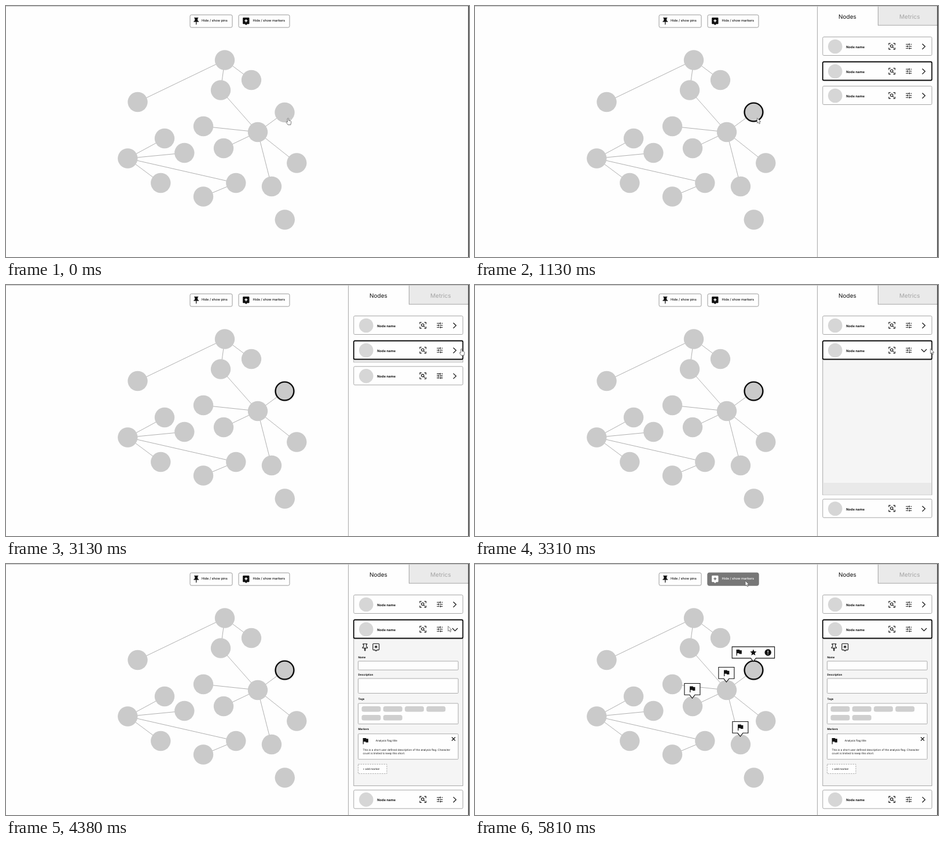
Write an HTML page that moves like this. It is 800x434 px and loops after 7440 ms.

```html
<!DOCTYPE html>
<html lang="en">
<head>
<meta charset="utf-8">
<title>Node graph prototype</title>
<style>
  html, body { margin: 0; width: 100%; height: 100%; overflow: hidden; background: #fefefe; }
  svg { display: block; width: 100vw; height: 100vh; font-family: Inter, Roboto, sans-serif; text-rendering: geometricPrecision; }
</style>
</head>
<body>
<svg id="stage" viewBox="0 0 800 434" preserveAspectRatio="none"></svg>
<script>
const LOOP = 7440;
const INK = '#111', LINE = '#a6a6a6', PAPER = '#fefefe';
const stage = document.getElementById('stage');

// Icons live on a 24-unit grid centred on (12, 12).
const ICON = {
  pin: 'M16 9V4h1a1 1 0 0 0 0-2H7a1 1 0 0 0 0 2h1v5a3 3 0 0 1-3 3v2h6v7l1 1 1-1v-7h6v-2a3 3 0 0 1-3-3z',
  bubble: 'M19 2H5a2 2 0 0 0-2 2v14a2 2 0 0 0 2 2h4l3 3 3-3h4a2 2 0 0 0 2-2V4a2 2 0 0 0-2-2z',
  spark: 'M12 6l1.6 3.4L17 11l-3.4 1.6L12 16l-1.6-3.4L7 11l3.4-1.6z',
  flag: 'M14.4 6L14 4H5v17h2v-7h5.6l.4 2h7V6z',
  star: 'M12 17.3L18.2 21l-1.6-7L22 9.2l-7.2-.6L12 2 9.2 8.6 2 9.2 7.5 14l-1.7 7z',
  focus: 'M3 8V3h5M16 3h5v5M21 16v5h-5M8 21H3v-5M14 14l3.5 3.5M15 11.2a3.8 3.8 0 1 1-7.6 0a3.8 3.8 0 1 1 7.6 0',
  tune: 'M2 5h12M18 5h4M14 2v6M2 12h5M11 12h11M8 9v6M2 19h9M15 19h7M14 16v6'
};

const icon = (name, x, y, scale, fill = INK, extra = '') =>
  `<path d="${ICON[name]}" transform="translate(${x} ${y}) scale(${scale}) translate(-12 -12)" fill="${fill}" ${extra}/>`;
const outlineIcon = (name, x, y, scale, width = 2) =>
  icon(name, x, y, scale, 'none', `stroke="${INK}" stroke-width="${width}"`);
const text = (s, x, y, size, extra = '') =>
  `<text x="${x}" y="${y}" font-size="${size}" fill="${INK}" ${extra}>${s}</text>`;
const rect = (x, y, w, h, fill, stroke = 'none', extra = '') =>
  `<rect x="${x}" y="${y}" width="${w}" height="${h}" fill="${fill}" stroke="${stroke}" ${extra}/>`;
const stroked = (d, width = 1.2, extra = '') =>
  `<path d="${d}" fill="none" stroke="${INK}" stroke-width="${width}" ${extra}/>`;

const nodes = {
  a: [378, 93.5], b: [424, 128], c: [371, 145.5], d: [227.5, 166], e: [481.5, 184],
  f: [341, 208], g: [435, 218], h: [376, 246], i: [274, 229], j: [308.3, 254],
  k: [210.3, 263.5], l: [502.3, 271.5], m: [267.3, 306], n: [397.3, 306],
  o: [341, 329.5], p: [459, 312], q: [481.8, 369.5]
};
const edges = 'ad ab ac cg ge gf gh gl gp ki kj km kn no'.split(' ');

function graph() {
  const lines = edges.map(([s, t]) => `M${nodes[s]}L${nodes[t]}`).join('');
  const discs = Object.values(nodes).map(([x, y]) => `<circle cx="${x}" cy="${y}" r="17.2"/>`).join('');
  return `<path d="${lines}" stroke="${LINE}" stroke-width=".9"/><g fill="#cacaca">${discs}</g>
    <circle id="ring" cx="481.5" cy="183.5" r="15.9" fill="none" stroke="#0a0a0a" stroke-width="2.4"/>`;
}

function button(x, w, label, textX, iconName, dark) {
  const fg = dark ? PAPER : INK, bg = dark ? '#777' : PAPER;
  const glyph = iconName === 'pin'
    ? icon('pin', 328.7, 26.2, .62, fg)
    : icon('bubble', 414.8, 26.2, .63, fg) + icon('spark', 414.8, 26.2, .63, bg);
  return rect(x, 15.3, w, 21.8, bg, dark ? '#777' : '#999', 'rx="2.5"') + glyph +
    text(label, textX, 27.3, 5.65, `style="fill:${fg}" font-weight="500"`);
}

function card(y, selected) {
  const chevron = 'M772.8 65.7L777.7 70.3L772.8 75';
  const down = 'M771.2 68.2L775.8 72.8L780.4 68.2';
  return `<g transform="translate(0 ${y})">` +
    rect(600.8, .5, 188.6, 32, PAPER, selected ? '#0a0a0a' : LINE, `rx="2" stroke-width="${selected ? 1.8 : 1}"`) +
    '<circle cx="622.3" cy="17" r="12.3" fill="#d6d6d6"/>' +
    text('Node name', 641.2, 20, 5.75, 'font-weight="700"') +
    outlineIcon('focus', 720.4, 16.7, .58) + outlineIcon('tune', 749.5, 16.8, .5, 2.2) +
    `<g transform="translate(0 -53.2)">${stroked(chevron, 1.2, selected ? 'id="closed"' : '')}` +
    `${selected ? stroked(down, 1.2, 'id="open"') : ''}</g></g>`;
}

function details() {
  const label = (s, y) => text(s, 608.5, y, 4.6, 'font-weight="700"');
  const field = (y, h) => rect(608.5, y, 172.8, h, PAPER, '#999', 'rx="1" stroke-width=".8"');
  const pills = [0, 1, 2, 3, 4, 5].map(n =>
    rect(614.5 + n % 4 * 37.3, n < 4 ? 246 : 261, 33, 9.4, '#cfcfcf', 'none', 'rx="3.5"')).join('');
  return outlineIcon('pin', 620.3, 144, .6, 1.8) +
    outlineIcon('bubble', 639.3, 143.8, .6, 1.8) + icon('spark', 639.3, 143.8, .6) +
    label('Name', 163) + field(168, 15.2) +
    label('Description', 193) + field(198, 25.5) +
    label('Tags', 235.2) + field(241, 35.6) + pills +
    label('Markers', 286.7) + field(293.7, 44) +
    icon('flag', 621, 306, .62) + text('Analysis flag title', 638.7, 307.2, 4.65) +
    stroked('M770.3 299.5l6 6M776.3 299.5l-6 6', 1.1) +
    text('This is a short user defined description of the analysis flag. Character', 616.5, 322.5, 4.6) +
    text('count is limited to keep this short.', 616.5, 329, 4.6) +
    rect(608.5, 346.2, 49.5, 16.2, PAPER, '#999', 'stroke-width=".8" stroke-dasharray="2.5 1.5"') +
    text('+ add marker', 616.5, 355.7, 4.6);
}

function panel() {
  return rect(591.6, -2, 220, 440, PAPER, LINE) +
    rect(696.5, -2, 112, 35.3, '#eaeaea', LINE) +
    text('Nodes', 643.4, 22, 10, 'text-anchor="middle"') +
    text('Metrics', 751, 22, 10, 'text-anchor="middle" style="fill:#a3a3a3"') +
    `<g id="body">${rect(600.8, 126, 188.6, 0, '#f5f5f5', LINE, 'id="bodyBox"')}
      ${rect(601.3, 126, 187.6, 0, '#e9e9e9', 'none', 'id="band"')}
      <g id="details">${details()}</g></g>` +
    card(53) + card(96, true) + `<g id="lastCard">${card(138)}</g>`;
}

function callout(key, half, tipY, glyphs) {
  const x = nodes[key][0] - .6;
  return `<path d="M${x - half} ${tipY - 25.5}h${half * 2}v19.8H${x + 4.5}L${x} ${tipY}L${x - 4.5} ${tipY - 5.7}H${x - half}z"
    fill="${PAPER}" stroke="${INK}" stroke-width="1.1"/>` + glyphs(x, tipY - 15.6);
}

function callouts() {
  const flag = (x, y) => icon('flag', x, y, .62);
  const trio = (x, y) => flag(x - 25, y) + icon('star', x, y, .56) +
    `<circle cx="${x + 25.3}" cy="${y}" r="5.7" fill="${INK}"/>` +
    `<path d="M${x + 25.3} ${y - 3.2}v3.8M${x + 25.3} ${y + 1.8}v1.4" stroke="${PAPER}" stroke-width="1.3"/>`;
  return callout('g', 13.5, 204, flag) + callout('h', 13.5, 232, flag) +
    callout('p', 13.5, 298, flag) + callout('e', 36.7, 168.6, trio);
}

const cursor = `<g id="cursor" fill="#fff" stroke="#666" stroke-width=".9" stroke-linejoin="round">
  <path id="arrow" d="M0 0V8.6L2 6.9L3.5 10L5 9.3L3.6 6.3H6.2z"/>
  <path id="hand" d="M-1.2 .9Q0 -.6 1 .9V4.3L4.3 5Q5.4 5.4 5.2 6.8L4.4 11.6H-.4L-3.3 7.6Q-3.5 6.1 -2.2 6.4L-1.2 7.3z"/>
</g>`;

stage.innerHTML = rect(0, 0, 800, 434, PAPER) + graph() +
  button(318, 73, 'Hide / show pins', 338, 'pin') +
  button(402, 88, 'Hide / show markers', 426.6, 'bubble') +
  `<g id="markers">${button(402, 88, 'Hide / show markers', 426.6, 'bubble', true)}${callouts()}</g>
  <g id="panel">${panel()}</g>` +
  rect(0, 0, 800, 1, '#c4c4c4') + rect(798.6, 0, 1.4, 434, '#333') + cursor;

const part = {};
stage.querySelectorAll('[id]').forEach(el => part[el.id] = el);

const span = (t, from, to) => Math.min(1, Math.max(0, (t - from) / (to - from)));
const easeOut = p => 1 - (1 - p) ** 3;
const easeInOut = p => p < .5 ? 4 * p ** 3 : 1 - 4 * (1 - p) ** 3;
const set = (name, attrs) => { for (const k in attrs) part[name].setAttribute(k, attrs[k]); };

function pointer(t) {
  const out = easeInOut(span(t, 1700, 2330));
  const back = easeInOut(span(t, 4200, 4890));
  const x = 487.5 + 299.5 * easeInOut(span(t, 1650, 2220)) - 320 * back;
  const y = 193.8 - 83.6 * out - 81.2 * back ** 1.3;
  return [x, y];
}

function draw(t) {
  set('ring', { opacity: span(t, 580, 700) });

  const slide = easeOut(span(t, 590, 1140));
  set('panel', { transform: `translate(${210 * (1 - slide)} 0)` });

  const grow = easeOut(span(t, 3130, 3450));
  const bottom = 131 + 252.4 * grow;
  const band = Math.min(bottom - 131, 252 * (1 - grow));
  set('body', { display: grow ? 'inline' : 'none' });
  set('bodyBox', { height: bottom - 126 });
  set('band', { y: bottom - band, height: band });
  set('details', { opacity: span(t, 3320, 3600) });
  set('lastCard', { transform: `translate(0 ${252.4 * grow})` });
  const turned = span(t, 3140, 3260);
  set('closed', { opacity: 1 - turned });
  set('open', { opacity: turned });

  set('markers', { opacity: span(t, 5640, 5790) });

  const pressing = t < 630 || (t >= 2330 && t < 3190) || (t >= 5000 && t < 5690);
  set('cursor', { transform: `translate(${pointer(t)})` });
  set('hand', { display: pressing ? 'inline' : 'none' });
  set('arrow', { display: pressing ? 'none' : 'inline' });
}

const start = performance.now();
function tick() {
  draw((performance.now() - start) % LOOP);
  requestAnimationFrame(tick);
}
tick();
</script>
</body>
</html>
```
